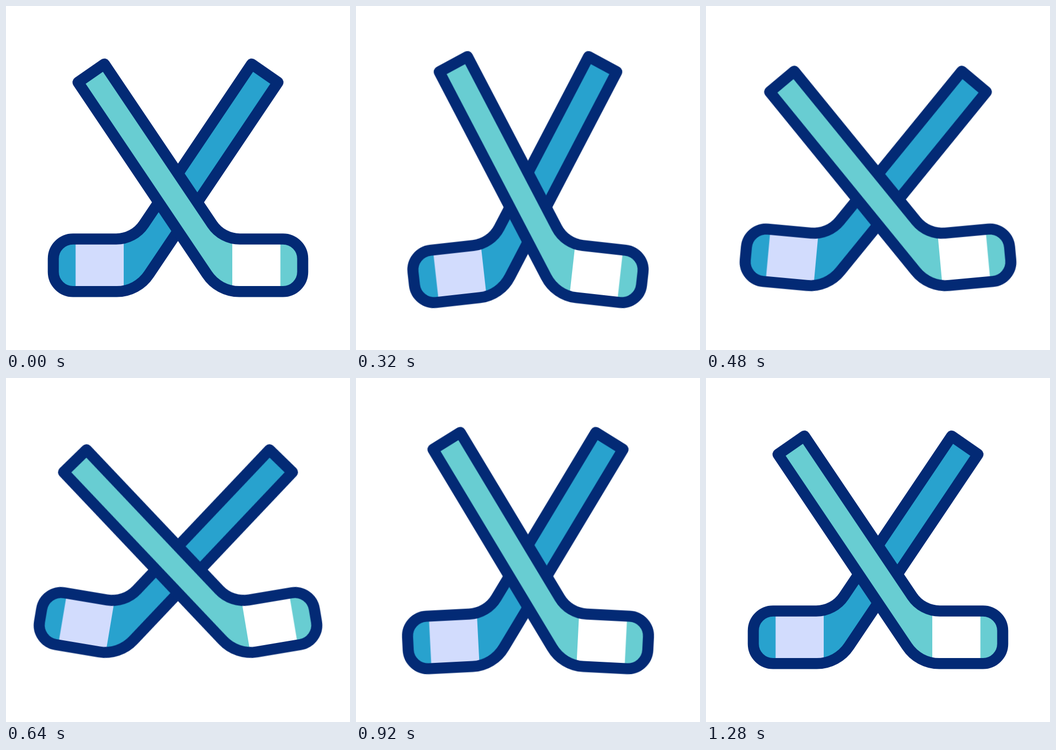
Animation of 640 by 640 pixels, one loop 1400 ms. Source, as an HTML page:

```html
<!DOCTYPE html>
<html lang="en">
<head>
<meta charset="utf-8">
<title>Hockey sticks</title>
<style>
  html, body { margin: 0; width: 100%; height: 100%; overflow: hidden; background: #fff; }
  svg { display: block; width: 100%; height: 100%; }
  .stick { transform-origin: 320px 320px; }
  .outline { stroke: #032a75; stroke-width: 20.6; stroke-linejoin: round; }
</style>
</head>
<body>
<svg viewBox="0 0 640 640">
  <defs>
    <path id="body" d="M183 108 L383.5 406 A62 62 0 0 0 435 433.5 H515.3
      A36.7 36.7 0 0 1 552 470.2 V494.6 A36.7 36.7 0 0 1 515.3 531.3
      H434 A72 72 0 0 1 374 499 L134 142 Z"/>
    <path id="tape" d="M421 434 H510.5 V531 H421 Z"/>
  </defs>
  <g transform="translate(640 0) scale(-1 1)">
    <g class="stick">
      <use href="#body" fill="#28a2ce"/>
      <use href="#tape" fill="#d2dcfd"/>
      <use href="#body" class="outline" fill="none"/>
    </g>
  </g>
  <g class="stick">
    <use href="#body" fill="#68cdd2"/>
    <use href="#tape" fill="#fff"/>
    <use href="#body" class="outline" fill="none"/>
  </g>
</svg>
<script>
  const LOOP = 1400, STEP = 40, LAST = 31;

  // [step, angle in degrees]
  const swing = [[0, 0], [6, 6.9], [13.9, -10], [22, 2.9], [30, 0], [LAST, 0]];

  const keyframes = swing.map(([step, deg]) => ({
    offset: step / LAST,
    transform: `rotate(${deg}deg)`,
    easing: 'ease-in-out'
  }));

  const swings = [...document.querySelectorAll('.stick')].map(el => {
    const anim = el.animate(keyframes, { duration: LAST * STEP, fill: 'both' });
    anim.pause();
    return anim;
  });

  // The pose advances in 40 ms steps and rests at both ends of the loop.
  function draw(now) {
    const step = Math.floor((now % LOOP) / STEP) - 1;
    const time = Math.min(LAST, Math.max(0, step)) * STEP;
    for (const anim of swings) anim.currentTime = time;
  }

  function tick() {
    draw(performance.now());
    requestAnimationFrame(tick);
  }
  tick();
</script>
</body>
</html>
```
